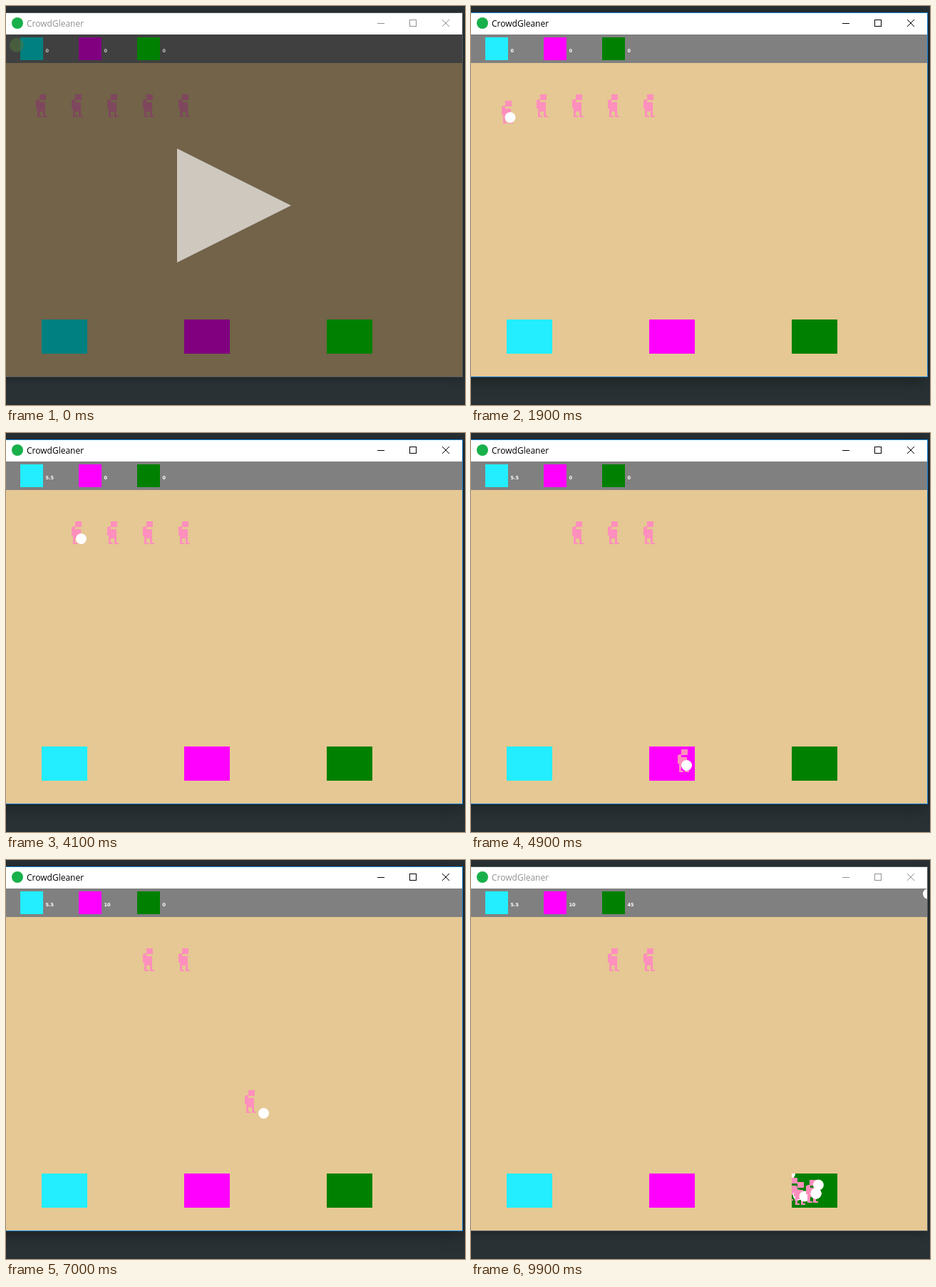
An HTML page with a canvas that plays this animation: 644x560 px, repeating every 10 s.

```html
<!DOCTYPE html>
<html lang="en">
<head>
<meta charset="utf-8">
<title>CrowdGleaner</title>
<style>
html, body { margin: 0; width: 100%; height: 100%; overflow: hidden; background: #293134; }
canvas { display: block; }
</style>
</head>
<body>
<canvas id="stage" width="644" height="560"></canvas>
<script>
const ctx = document.getElementById('stage').getContext('2d');
const LOOP = 10000, STEP = 100, LAG = 16;
const RUN = 500, HOVER = 9300, BLUR = 9900;
const SAND = '#e5c893', PINK = '#ff8fbc', GREEN = '#008000';
const BRIGHT = ['#22eeff', '#ff00ff', GREEN];
const DIM = ['#008080', '#800080', GREEN];

const linear = f => f;
const speedUp = f => f * f;
const slowDown = f => f * (2 - f);
const smooth = f => f * f * (3 - 2 * f);

// Each leg carries the pointer on from where the last one left it.
const legs = [];
let here = [377.5, 271.5];
function go(start, end, x, y, ease = linear) {
  legs.push({ start, end, ease, from: here, to: [x, y] });
  here = [x, y];
}

// To the first person, then into the cyan bin.
go(600, 1200, 66, 133.5, smooth);
go(1200, 1600, 53.5, 144.5);
go(1800, 2600, 88.5, 425, smooth);
go(2600, 2900, 83.5, 471.5, slowDown);
// The second, into the magenta bin.
go(3200, 3600, 128.5, 230, speedUp);
go(3600, 3900, 106.5, 148.5, slowDown);
go(4000, 4100, 105.5, 148.5);
go(4200, 4800, 309.5, 478.5, smooth);
go(4800, 4900, 302.5, 466.5);
go(5000, 5300, 281.5, 447.5, speedUp);
// The third, into the green bin.
go(5300, 5900, 128.5, 117.5, smooth);
go(5900, 6200, 158.5, 143.5, slowDown);
go(6300, 6400, 155.5, 143.5);
go(6500, 7000, 361.5, 355.5, speedUp);
go(7000, 7100, 447.5, 440.5);
go(7100, 7200, 459, 470);
go(7200, 7300, 468, 472);
go(7300, 7400, 484, 468, slowDown);
// Away and out at the top right.
go(7800, 8600, 563.5, 187.5, smooth);
go(8900, 9000, 565.5, 184.5);
go(9000, 9200, 641.5, 47.5);

const HOME_Y = 124;
const people = [
  { grab: 1600, drop: 3000, score: '5.5' },
  { grab: 4100, drop: 5000, score: '10' },
  { grab: 6400, drop: 7800, score: '45' },
  {}, {}
].map((p, i) => ({ ...p, x: 42 + 50 * i }));

function pointer(t) {
  const leg = legs.filter(l => t >= l.start).pop() || legs[0];
  const f = Math.min(1, Math.max(0, (t - leg.start) / (leg.end - leg.start)));
  return leg.from.map((a, k) => a + (leg.to[k] - a) * leg.ease(f));
}

function rect(color, x, y, w, h) {
  ctx.fillStyle = color;
  ctx.fillRect(x, y, w, h);
}

function disc(color, x, y, r) {
  ctx.fillStyle = color;
  ctx.beginPath();
  ctx.arc(x, y, r, 0, Math.PI * 2);
  ctx.fill();
}

function text(str, x, y, font, color) {
  ctx.font = font;
  ctx.fillStyle = color;
  ctx.fillText(str, x, y);
}

function clipped(x, y, w, h, paint) {
  ctx.save();
  ctx.beginPath();
  ctx.rect(x, y, w, h);
  ctx.clip();
  paint();
  ctx.restore();
}

function walker(x, y) {
  const part = (dx, dy, w, h) => rect(PINK, x + dx, y + dy, w, h);
  part(5, 0, 9, 8);     // head
  part(2, 7, 3, 2);     // neck
  part(0, 8, 5, 12);    // back
  part(3, 11, 10, 13);  // body
  for (const leg of [2, 10]) {
    part(leg, 20, 3, 11);
    part(leg, 30, 6, 2);
  }
}

function person(p, t) {
  if (t >= p.drop + STEP) return;
  let x = p.x, y = HOME_Y;
  if (t > p.grab) {
    const from = pointer(p.grab), to = pointer(Math.min(t, p.drop) - LAG);
    x = Math.round(x + to[0] - from[0]);
    y = Math.round(y + to[1] - from[1]);
  }
  ctx.globalAlpha = t >= p.drop ? 0.5 : 1;
  walker(x, y);
  ctx.globalAlpha = 1;
}

function cursor(t) {
  disc('#fff', ...pointer(t), 7.5);
}

function boxes(colors) {
  colors.forEach((c, i) => {
    rect(c, 20 + 82 * i, 44, 32, 32);
    rect(c, 50 + 200 * i, 440, 64, 48);
  });
}

// The green bin keeps everything that passes over it.
function trail(t) {
  const guest = people[2];
  clipped(450, 440, 64, 48, () => {
    for (let s = 7000; s <= Math.min(t, 8600); s += STEP) {
      if (s < guest.drop) person(guest, s);
      cursor(s);
    }
  });
}

function line(x1, y1, x2, y2) {
  ctx.beginPath();
  ctx.moveTo(x1, y1);
  ctx.lineTo(x2, y2);
  ctx.stroke();
}

function frame(active, hover) {
  rect('#293134', 0, 0, 644, 560);
  ctx.save();
  ctx.shadowColor = `rgba(0,0,0,${active ? 0.38 : 0.3})`;
  ctx.shadowBlur = active ? 22 : 12;
  ctx.shadowOffsetY = active ? 4 : 2;
  rect(active ? '#1883d7' : '#555c5f', -60, 9, 701, 512);
  ctx.restore();
  rect('#fff', 0, 10, 640, 30);
  disc('#18b04a', 16, 24, 8);
  const ink = active ? '#000' : '#919191';
  text('CrowdGleaner', 29, 29, '12px "Open Sans", sans-serif', ink);
  if (hover) rect('#e81123', 595, 10, 45, 30);
  ctx.lineWidth = 1;
  ctx.strokeStyle = ink;
  ctx.strokeRect(566.5, 19.5, 9, 9);
  rect(ink, 521, 24, 10, 1);
  ctx.strokeStyle = hover ? '#fff' : ink;
  line(612, 19, 622, 29);
  line(622, 19, 612, 29);
}

function pauseScreen() {
  rect('rgba(0,0,0,.5)', 0, 40, 640, 480);
  boxes(DIM);
  ctx.fillStyle = 'rgba(255,255,255,.65)';
  ctx.beginPath();
  ctx.moveTo(240, 200);
  ctx.lineTo(400, 280);
  ctx.lineTo(240, 360);
  ctx.fill();
  disc('rgba(80,120,60,.5)', 15, 55, 10);
}

function scores(t) {
  for (let i = 0; i < 3; i++) {
    const { drop, score } = people[i];
    text(t >= drop ? score : '0', 55.5 + 82 * i, 65, 'bold 6.5px "DejaVu Sans", sans-serif', '#fff');
  }
}

function draw(t) {
  const paused = t < RUN;
  frame(!paused && t < BLUR, t === HOVER);
  rect('#808080', 0, 40, 640, 40);
  rect(SAND, 0, 80, 640, 440);
  boxes(BRIGHT);
  clipped(0, 40, 640, 480, () => {
    if (!paused) scores(t);
    trail(t);
    for (const p of people) person(p, t);
    if (!paused) return cursor(t);
    pauseScreen();
    ctx.globalAlpha = 0.7;
    scores(t);
    ctx.globalAlpha = 1;
  });
}

const began = performance.now();
function tick() {
  const t = (performance.now() - began) % LOOP;
  draw(Math.floor(t / STEP) * STEP);
  requestAnimationFrame(tick);
}
tick();
</script>
</body>
</html>
```
